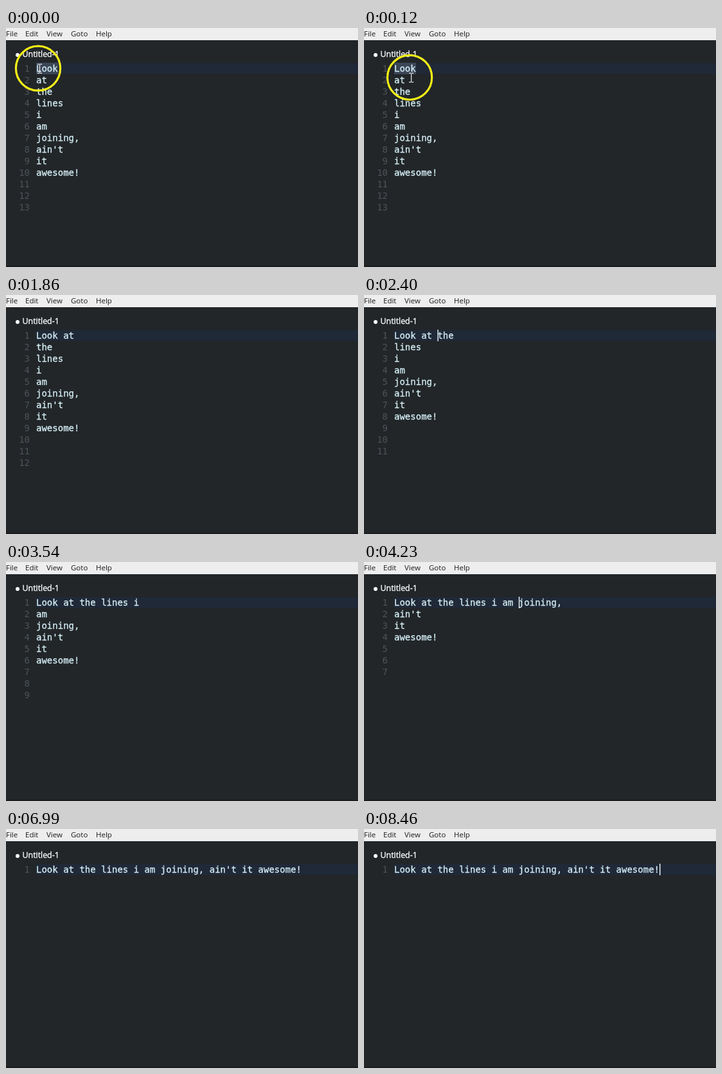
An HTML page that plays this animation: 548 px wide and 372 px high, repeating every 9000 ms.

```html
<!DOCTYPE html>
<html lang="en">
<head>
<meta charset="utf-8">
<title>Joining lines</title>
<style>
  html, body { margin: 0; width: 100%; height: 100%; overflow: hidden; background: #222629; }
  svg { display: block; }
  text { white-space: pre; }
  .ui { font-family: "Open Sans", sans-serif; font-size: 11.5px; fill: #1c1c1c; }
  .tab { font-size: 12.4px; fill: #fff; stroke: #fff; stroke-width: .35px; }
  .code { font: 14px "DejaVu Sans Mono", monospace; fill: #d6f0f7; }
  .line { stroke: #d6f0f7; stroke-width: .3px; }
  .num { fill: #4e5357; text-anchor: end; }
</style>
</head>
<body>
<svg width="548" height="372" viewBox="0 0 548 372">
  <rect width="548" height="372" fill="#222629"/>
  <rect y="370" width="548" height="2" fill="#1a1c20"/>
  <rect width="548" height="19" fill="#eee"/>
  <g class="ui">
    <text x="0" y="13">File</text>
    <text x="30" y="13">Edit</text>
    <text x="63" y="13">View</text>
    <text x="101" y="13">Goto</text>
    <text x="140" y="13">Help</text>
    <text class="tab" x="25.5" y="45">Untitled-1</text>
  </g>
  <circle cx="18" cy="42" r="3" fill="#fff"/>
  <rect x="46" y="54.5" width="502" height="17" fill="#202937"/>
  <rect id="selection" x="47" y="54" width="34" height="18" fill="#3b4656"/>
  <g id="rows" class="code"></g>
  <rect id="caret" y="54" width="1.5" height="18" fill="#e4eef2"/>
  <g id="pointer" fill="none">
    <circle r="34.6" stroke="#f4ef16" stroke-width="3.2"/>
    <path d="M-1 -6.5H2.2M3.2 -6.5H6M2.5 -6V7M-1 7.5H2.2M3.2 7.5H6" stroke="#eee" stroke-width="1.2"/>
  </g>
</svg>
<script>
  const LOOP = 9000, LEFT = 47, ADVANCE = 8.428, ROW = 18, ROWS = 13;
  const words = "Look at the lines i am joining, ain't it awesome!".split(" ");
  const joins = [1560, 2340, 2790, 3270, 3720, 4080, 4410, 4740, 5040, 5460, 5730, 6000];
  // The caret starts hidden and flips at each of these times.
  const blinks = [540, 810, 1080, 1350, 1560, 1860, 2190, 2490, 2790, 3060, 3270, 3540, 3720,
    5100, 5460, 5730, 6000, 6390, 6660, 6990, 7260, 7560, 7890, 8190, 8460];

  const byId = id => document.getElementById(id);
  const passed = (times, t) => times.filter(x => x <= t).length;
  const show = (el, on) => el.setAttribute("visibility", on ? "visible" : "hidden");

  function addText(x, y, cls) {
    const el = document.createElementNS("http://www.w3.org/2000/svg", "text");
    el.setAttribute("x", x);
    el.setAttribute("y", y);
    el.setAttribute("class", cls);
    return byId("rows").appendChild(el);
  }

  const rows = Array.from({ length: ROWS }, (_, i) => {
    const y = 68 + i * ROW;
    return { num: addText(37, y, "num"), line: addText(LEFT, y, "line") };
  });

  function drawText(t) {
    const joined = passed(joins, t);
    rows.forEach(({ num, line }, i) => {
      num.textContent = i < ROWS - joined ? i + 1 : "";
      line.textContent = i ? words[joined + i] || "" : words.slice(0, joined + 1).join(" ");
    });
    show(byId("selection"), joined === 0);

    // The caret sits where the newest word was attached.
    const before = words.slice(0, joined || 1).join(" ").length;
    const column = before + (joined > 0 && joined < words.length ? 1 : 0);
    byId("caret").setAttribute("x", LEFT + column * ADVANCE);
    show(byId("caret"), passed(blinks, t) % 2 === 1);
  }

  function drawPointer(t) {
    const p = Math.min(1, Math.max(0, (t - 30) / 480));
    const e = p * p * (3 - 2 * p);
    byId("pointer").setAttribute("transform", `translate(${50 + 224 * e} ${62.8 + 150 * e})`);
    show(byId("pointer"), t < 540);
  }

  function frame() {
    const t = performance.now() % LOOP;
    drawText(t);
    drawPointer(t);
    requestAnimationFrame(frame);
  }
  frame();
</script>
</body>
</html>
```
